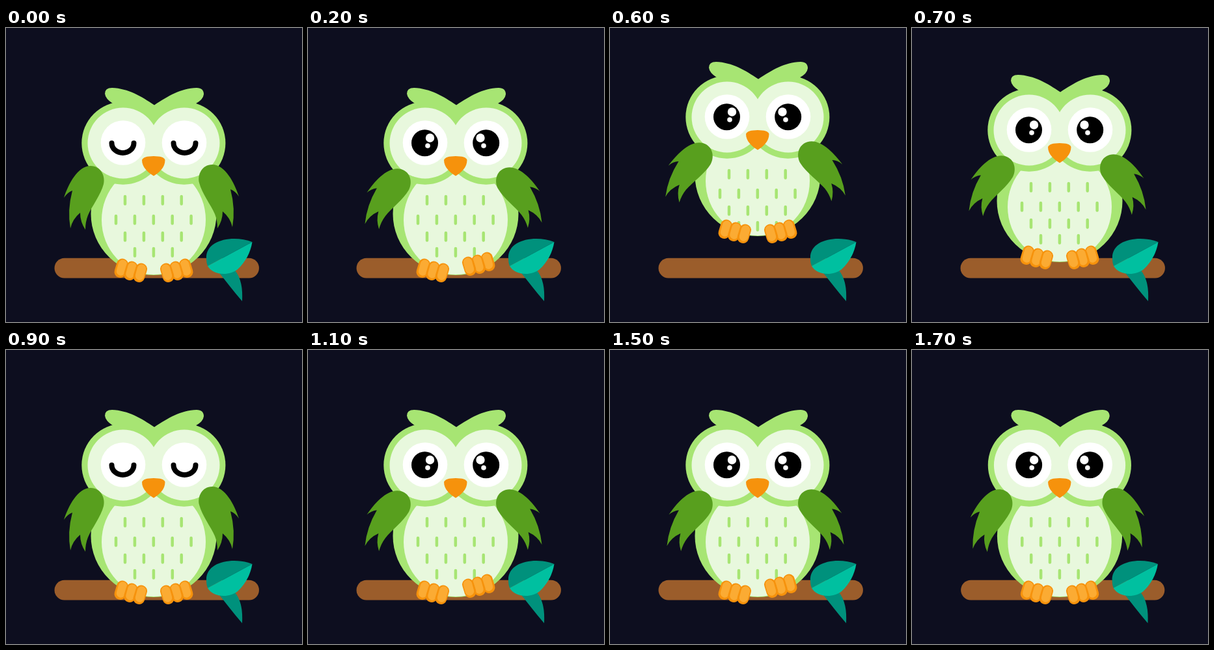
An HTML page that plays this animation: 455x452 px, repeating every 1.8 s.

```html
<!DOCTYPE html>
<html lang="en">
<head>
<meta charset="utf-8">
<title>Owl on a branch</title>
<style>
  html, body { margin: 0; width: 100%; height: 100%; overflow: hidden; background: #0d0e1f; }
  svg { display: block; width: 100%; height: 100%; }
  .line { fill: none; stroke-linecap: round; }
</style>
</head>
<body>
<svg viewBox="0 0 455 452">
  <defs>
    <path id="wing" fill="#589f1e" d="M130 212C146 212 153 228 150 240C146 256 132 274 126 288Q122 298 122 310Q114 298 114 284Q102 294 99 308Q94 280 102 250Q94 253 89 261C96 240 110 212 130 212Z"/>
    <g id="toe" class="line">
      <path stroke="#f6920c" stroke-width="18" d="M179 363.500L175.500 375"/>
      <path stroke="#fbab33" stroke-width="13.500" d="M179.500 363L176.500 374"/>
    </g>
    <g id="foot">
      <use href="#toe"/>
      <use href="#toe" x="14.500" y="4"/>
      <use href="#toe" x="29" y="7"/>
    </g>
  </defs>
  <g id="scene">
    <rect x="74.500" y="353.700" width="314.500" height="30.800" rx="15.400" fill="#9b5d2b"/>
    <path fill="#00917c" d="M325 373C337 388 350 405 363 420C364 401 362 384 350 370Z"/>
    <path fill="#00917c" d="M378.500 329C350 318 306 325 308 355Q308 361 310 366Z"/>
    <path fill="#00c0a0" d="M310 366C318 380 342 382 356 371C368 360 376 345 378.500 329Z"/>
    <g id="owl">
      <g id="body">
        <ellipse cx="227" cy="286" rx="96.500" ry="94" fill="#a7e573"/>
        <ellipse cx="227" cy="295" rx="80" ry="84" fill="#e8f8dd"/>
      </g>
      <path id="dashes" class="line" stroke="#a7e573" stroke-width="4.500"/>
      <g fill="#a7e573">
        <circle cx="180" cy="177" r="63.700"/>
        <circle cx="273.700" cy="177" r="63.700"/>
        <path d="M152 101Q152 92 163 92C188 93 208 105 228 118.500C250 104 268 93 293 92Q304 92 304 102Q303 110 292 116L228 150L164 116Q153 109 152 101Z"/>
      </g>
      <g fill="#e8f8dd">
        <circle cx="180" cy="177" r="54.500"/>
        <circle cx="274" cy="177" r="54.500"/>
      </g>
      <g fill="#fff">
        <circle cx="180" cy="176.500" r="34.300"/>
        <circle cx="274" cy="176.500" r="34.300"/>
      </g>
      <g id="open">
        <circle cx="179.500" cy="176.700" r="20.500"/>
        <circle cx="273.700" cy="176.700" r="20.500"/>
        <g fill="#fff">
          <circle cx="187.500" cy="169" r="6.700"/>
          <circle cx="184" cy="181" r="3.800"/>
          <circle cx="265" cy="169" r="6.700"/>
          <circle cx="270" cy="181" r="3.800"/>
        </g>
      </g>
      <path id="closed" class="line" stroke="#000" stroke-width="8" d="M162.500 177a17 15 0 0 0 34 0M257.500 177a17 15 0 0 0 34 0"/>
      <path fill="#f6920c" d="M209 203Q211 197 227 197Q243 197 244.500 203C244.500 214 236 222 227 227.500C218 222 209 214 209 203Z"/>
      <use id="leftWing" href="#wing"/>
      <g transform="matrix(-1 0 0 1 447 -2)"><use id="rightWing" href="#wing"/></g>
      <use id="leftFoot" href="#foot"/>
      <g transform="matrix(-1 0 0 1 454 0)"><use id="rightFoot" href="#foot"/></g>
    </g>
  </g>
</svg>
<script>
const $ = id => document.getElementById(id);
const STEP = 100;

const rows = [[183, 259, 4], [169, 289, 5], [183, 315, 4], [198, 339, 3]];
$('dashes').setAttribute('d', rows.map(([x, y, count]) =>
  Array.from({ length: count }, (_, i) => `M${x + 28.9 * i} ${y}v11.5`).join('')).join(''));

// wing: spread amount, y: jump height, tuck: extra rise of body and feet, left/right: raised foot
const pose = (wing, y = 0, tuck = 0, left = 0, right = 0) => ({ wing, y, tuck, left, right });
const rest = pose(0), half = pose(.5), spread = pose(1);
const stepLeft = pose(.5, 0, 0, 10), stepRight = pose(1, 0, 0, 0, 10);
const hop = pose(1, 20), leap = pose(1.13, 40, 20), peak = pose(2, 58);
const poses = [
  rest, half, stepRight, hop, leap, peak, leap, hop, half,
  rest, half, stepRight, spread, stepLeft, spread, stepRight, spread, half
];

const move = (id, value) => $(id).setAttribute('transform', value);
const lift = (id, height) => move(id, `translate(0 ${-height})`);

function draw() {
  const { wing, y, tuck, left, right } = poses[Math.floor(performance.now() / STEP) % poses.length];
  const shift = Math.min(wing, 1.05);
  const turn = `translate(${13 * shift} ${5 * shift}) rotate(${15.5 * wing} 130 212)`;
  move('leftWing', turn);
  move('rightWing', turn);
  lift('owl', y);
  lift('body', tuck);
  lift('leftFoot', tuck + left);
  lift('rightFoot', tuck + right);
  move('scene', wing === .5 ? 'translate(.92 0) scale(.996 1)' : '');
  $('open').style.display = wing ? '' : 'none';
  $('closed').style.display = wing ? 'none' : '';
  requestAnimationFrame(draw);
}
draw();
</script>
</body>
</html>
```
